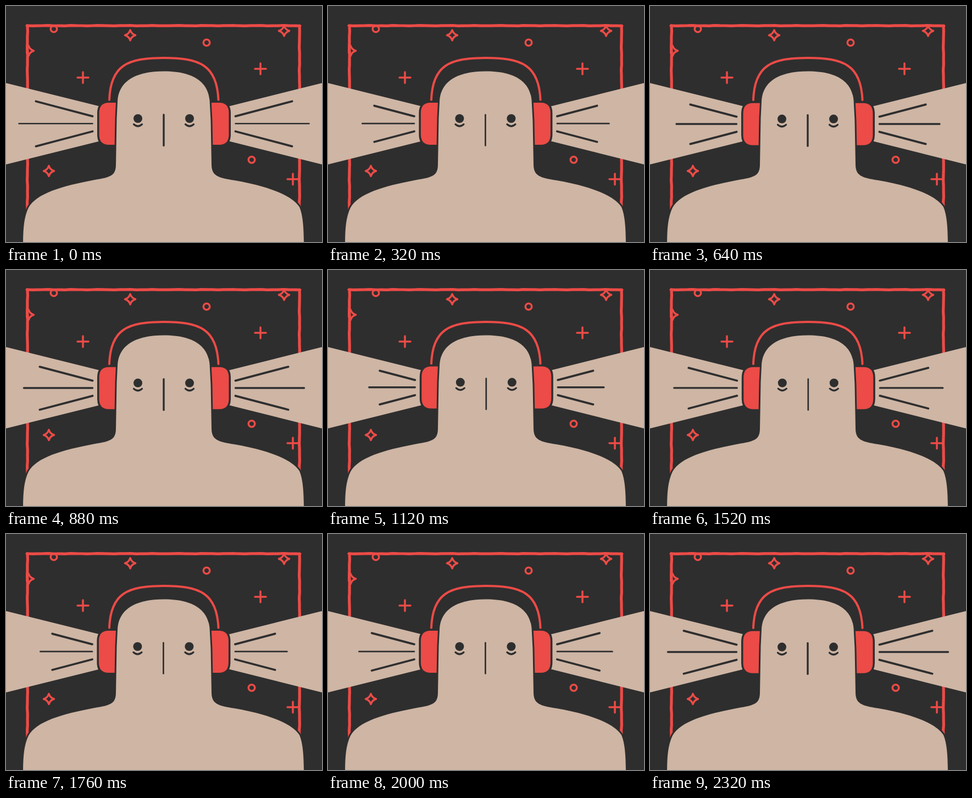
Recreate the animation shown at these times as an HTML page. Size 575 by 432 pixels, loop 2400 ms.

```html
<!DOCTYPE html>
<html lang="en">
<head>
<meta charset="utf-8">
<title>Headphones</title>
<style>
  html, body { margin: 0; width: 100%; height: 100%; overflow: hidden; background: #2e2e2e; }
  svg { display: block; width: 100vw; height: 100vh; }
  .line { fill: none; stroke-linecap: round; stroke-linejoin: round; }
  .red { stroke: #ec4b47; }
  .dark { stroke: #2e2e2e; }
</style>
</head>
<body>
<svg viewBox="0 0 575 432">
  <defs>
    <clipPath id="window"><path d="M36 33H537V432H36Z"/></clipPath>
    <path id="star" d="M0 -9.5Q2.2 -2.2 9.5 0Q2.2 2.2 0 9.5Q-2.2 2.2 -9.5 0Q-2.2 -2.2 0 -9.5Z"/>
    <path id="plus" d="M-10 0H10M0 -10V10"/>
    <circle id="ring" r="5.8"/>
    <path id="cup" d="M206 177H187Q169.5 177 169.5 196V235Q169.5 254 187 254H206Z"
          fill="#ec4b47" stroke="#2e2e2e" stroke-width="7" paint-order="stroke"/>
  </defs>
  <rect width="575" height="432" fill="#2e2e2e"/>

  <g id="sky" class="line red" stroke-width="3.5" clip-path="url(#window)"></g>
  <path id="frame" class="line red" stroke-width="5.2"/>
  <g fill="#ceb5a4">
    <path d="M-12 138L172 184V247L-12 293Z"/>
    <path d="M587 138L404 184V247L587 293Z"/>
  </g>
  <path class="line red" stroke-width="4"
        d="M188 172C190 108 222 95 287 95C352 95 384 108 386.5 172"/>

  <g id="cups">
    <use href="#cup"/>
    <use href="#cup" transform="matrix(-1 0 0 1 575 0)"/>
  </g>

  <path fill="#ceb5a4" stroke="#2e2e2e" stroke-width="6" paint-order="stroke"
        d="M31 445C31 410 32 388 41 369C56 343 100 330 160 318.5C190 313.5 200 311 200 290
           L201.5 205L203 175C204 146 224 119.5 287 119.5C350 119.5 368 146 370.5 172
           L372.5 210L374 290C374 311 386 314.5 415 319C470 328.5 518 344 534 368C541 385 542 410 542 445Z"/>

  <g id="face">
    <g fill="#2e2e2e"><circle cx="240" cy="206" r="8"/><circle cx="334" cy="206" r="8"/></g>
    <path class="line dark" stroke-width="3.2" d="M232.5 216.5Q240 223.5 247.5 216.5M326.5 216.5Q334 223.5 341.5 216.5"/>
    <path id="nose" class="line dark" d="M287 199V255.5"/>
  </g>
  <path id="outer" class="line dark" stroke-width="3.8"/>
  <path id="middle" class="line dark"/>
</svg>
<script>
const $ = id => document.getElementById(id);
const STEP = 80, LOOP = 2400;

const shapes = {
  star: [[226, 53.5], [506, 45.5], [78, 302], [41, 82]],
  plus: [[140, 131], [463, 115], [522, 317]],
  ring: [[87, 42], [365, 67], [447, 281.5]]
};
$('sky').innerHTML = Object.entries(shapes).map(([id, spots]) =>
  spots.map(([x, y]) => `<use href="#${id}" x="${x}" y="${y}"/>`).join('')).join('');

// Slightly uneven hand-drawn straight line
function roughLine(x1, y1, x2, y2) {
  const n = Math.round(Math.hypot(x2 - x1, y2 - y1) / 10);
  const points = Array.from({ length: n + 1 }, (_, i) => {
    const off = 0.3 * Math.sin(i * 1.3) + 0.2 * Math.sin(i * 2.9);
    return `${x1 + (x2 - x1) * i / n + off} ${y1 + (y2 - y1) * i / n + off}`;
  });
  return 'M' + points.join('L');
}
$('frame').setAttribute('d',
  roughLine(39, 400, 39, 36) + roughLine(38, 36, 534.5, 36) + roughLine(534, 36, 534, 400));

// Redrawn line looks: shift x, shift y, nose weight, middle ray weight
const still  = [0, 0, 3.4, 2.5];
const low    = [0, 0.8, 3.4, 3.4];
const left   = [-0.6, 0, 2.7, 2.7];
const right  = [0.8, 0.7, 2.7, 3.2];
const raised = [0.8, -0.4, 2.7, 3.4];

// Beat: outer tip of the middle ray and the look of that drawing
const beat = [
  [23.5, still], [43, right], [32.5, low], [47, raised], [63, left],
  [74, raised], [68, still], [57, left], [48, low]
];

function rays(dx, y, length, rise) {
  return [-1, 1].map(side =>
    `M${287.5 + side * 130 + dx} ${y}l${side * length} ${rise}`).join('');
}

function draw(ms) {
  const [tip, [dx, dy, nose, weight]] = beat[Math.floor(ms % LOOP / STEP) % beat.length];
  const reach = (157.5 - tip) / 134;
  const shift = `translate(${dx} ${dy})`;
  $('cups').setAttribute('transform', shift);
  $('face').setAttribute('transform', shift);
  $('nose').setAttribute('stroke-width', nose);
  $('middle').setAttribute('stroke-width', weight);
  $('middle').setAttribute('d', rays(dx, 215.2 + dy, 134 * reach, 0));
  $('outer').setAttribute('d',
    rays(dx, 201.8 + dy, 103 * reach, -27.3 * reach) +
    rays(dx, 229.5 + dy, 103 * reach, 27.3 * reach));
}

let start, last = -1;
function tick(now) {
  start ??= now;
  const step = Math.floor((now - start) / STEP);
  if (step !== last) draw((last = step) * STEP);
  requestAnimationFrame(tick);
}
draw(0);
requestAnimationFrame(tick);
</script>
</body>
</html>
```
